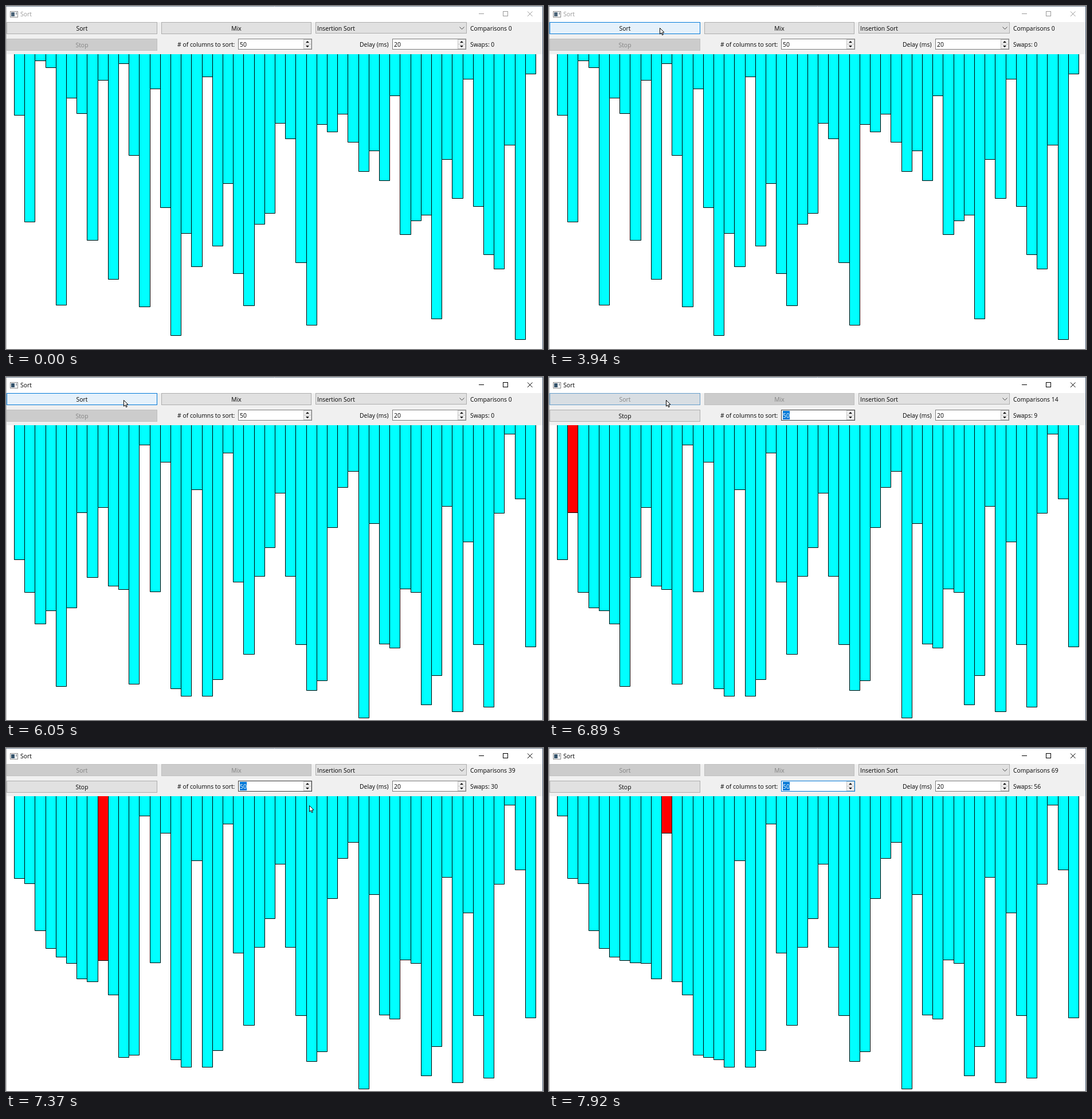
Write an HTML page with a canvas that moves like this. It is 937 px wide and 598 px high and loops after 7.99 s.

```html
<!DOCTYPE html>
<html lang="en">
<head>
<meta charset="utf-8">
<title>Sort</title>
<style>
html, body { margin: 0; width: 100%; height: 100%; overflow: hidden; background: #fff; }
canvas { display: block; }
</style>
</head>
<body>
<canvas id="stage" width="937" height="598"></canvas>
<script>
const g = document.getElementById('stage').getContext('2d');
const LOOP = 7990, SORT_AT = 6610, MIX_AT = 4820, ACTIVE_AT = 4690;

// Bottom edge of each column
const before = [190, 376, 95, 107, 521, 160, 187, 408, 129, 476, 100, 260, 524, 144, 351, 574, 396,
  454, 123, 418, 309, 466, 522, 380, 361, 204, 231, 447, 556, 206, 219, 188, 237, 288, 252, 304,
  156, 398, 374, 364, 545, 267, 335, 127, 349, 433, 458, 242, 581, 118];
const mixed = [318, 375, 430, 407, 539, 402, 236, 349, 227, 364, 370, 535, 118, 374, 148, 543, 556,
  196, 556, 527, 132, 357, 483, 347, 297, 202, 347, 466, 546, 529, 262, 192, 164, 594, 255, 465,
  472, 369, 375, 571, 520, 225, 583, 287, 466, 575, 237, 99, 212, 470];

// One state per comparison of the insertion sort
function sortStates(cols) {
  const a = cols.slice(), states = [{ a: cols, swaps: 0, red: 1 }];
  let swaps = 0;
  for (let i = 1; i < 16; i++) {
    for (let j = i, moving = true; moving;) {
      moving = j > 0 && a[j] < a[j - 1];
      if (moving) {
        [a[j - 1], a[j]] = [a[j], a[j - 1]];
        j--;
        swaps++;
      }
      states.push({ a: a.slice(), swaps, red: j });
    }
  }
  return states;
}
const states = sortStates(mixed);

// Linear track of [time, ...values]
function track(t, keys) {
  if (t <= keys[0][0]) return keys[0].slice(1);
  for (let i = 1; i < keys.length; i++) {
    const p = keys[i - 1], q = keys[i];
    if (t < q[0]) {
      const k = (t - p[0]) / (q[0] - p[0]);
      return p.slice(1).map((v, n) => v + (q[n + 1] - v) * k);
    }
  }
  return keys[keys.length - 1].slice(1);
}
const level = (t, ...keys) => track(t, keys)[0];
const blend = (a, b, k) => a.map((v, i) => v + (b[i] - v) * k);
const css = c => `rgb(${c.map(Math.round)})`;

const cursorPath = [
  [250, 881, 557], [520, 668, 180], [680, 352, 12], [800, 340, 32], [990, 340, 30],
  [1130, 284, 9], [1340, 225, 63], [1620, 169, 38], [3939, 169, 38], [3940, 193, 38],
  [4290, 324, 42], [5350, 322, 42], [5700, 262, 25], [6050, 205, 40], [6150, 203, 40],
  [6890, 203, 40], [7100, 330, 17], [7370, 529, 100]
];

function box(x, y, w, h, fill, line) {
  g.fillStyle = fill;
  g.fillRect(x, y, w, h);
  g.strokeStyle = line;
  g.strokeRect(x + .5, y + .5, w - 1, h - 1);
}

function line(color, ...pts) {
  g.strokeStyle = color;
  g.beginPath();
  for (let i = 0; i < pts.length; i += 2) g.lineTo(pts[i], pts[i + 1]);
  g.stroke();
}

function shape(color, x, y, pts) {
  g.beginPath();
  for (let i = 0; i < pts.length; i += 2) g.lineTo(x + pts[i], y + pts[i + 1]);
  g.closePath();
  g.fillStyle = color;
  g.fill();
}

function text(s, x, y, color = '#000', align = 'left') {
  g.fillStyle = color;
  g.textAlign = align;
  g.fillText(s, x, y);
}

function button(label, x, y, w, { hot = 0, press = 0, off = 0, grey = off > 0 }) {
  const fill = blend(blend([225, 225, 225], [229, 241, 251], hot), [204, 228, 247], press);
  const edge = blend([173, 173, 173], [0, 120, 215], hot);
  box(x, y, w, 21, css(blend(fill, [204, 204, 204], off)), css(blend(edge, [191, 191, 191], off)));
  text(label, x + w / 2, y + 15, grey ? '#838383' : '#000', 'center');
}

function spin(value, x, edge, selected) {
  box(x, 57, 129, 19, '#fff', edge);
  if (selected) {
    g.fillStyle = '#0078d7';
    g.fillRect(x + 3, 59, 12, 15);
  }
  text(value, x + 3, 71, selected ? '#fff' : '#000');
  box(x + 114, 58, 14, 9, '#f0f0f0', '#c4c4c4');
  box(x + 114, 66, 14, 9, '#f0f0f0', '#c4c4c4');
  shape('#000', x + 121, 61, [-3, 3, 0, 0, 3, 3]);
  shape('#000', x + 121, 69, [-3, 0, 0, 3, 3, 0]);
}

function titleBar(active) {
  const ink = active ? '#000' : '#999';
  box(7, 9, 14, 11, '#fff', '#8a8a8a');
  g.fillStyle = active ? '#36546c' : '#4c6478';
  g.fillRect(9, 11, 6, 7);
  g.fillStyle = '#9aa4ac';
  g.fillRect(17, 11, 2, 4);
  text('Sort', 25, 18, ink);
  line(ink, 825, 13.5, 834, 13.5);
  g.strokeRect(867.5, 9.5, 8, 8);
  line(ink, 910, 9.5, 918.5, 18);
  line(ink, 918.5, 9.5, 910, 18);
}

function toolbar(t, comps, swaps) {
  const sorting = t >= SORT_AT;
  g.fillStyle = '#f0f0f0';
  g.fillRect(1, 28, 935, 56);
  button('Sort', 1, 28, 263, {
    hot: level(t, [1340, 0], [1560, 1], [4060, 1], [4290, 0], [5700, 0], [5950, 1]),
    off: level(t, [SORT_AT - 1, 0], [7150, 1]),
    grey: sorting
  });
  button('Mix', 271, 28, 262, {
    hot: level(t, [680, 0], [800, 1], [1000, 1], [1250, 0], [4100, 0], [4290, 1], [5600, 1], [5850, 0]),
    press: level(t, [4690, 0], [4750, 1], [4820, .75], [5020, 0]),
    off: level(t, [SORT_AT - 1, 0], [6800, 1]),
    grey: sorting
  });
  button('Stop', 1, 57, 263, { off: level(t, [SORT_AT - 1, 1], [6800, 0]), grey: !sorting });

  box(540, 28, 264, 20, '#e1e1e1', '#adadad');
  text('Insertion Sort', 543, 43);
  line('#444', 791.5, 36.5, 795.5, 40.5, 799.5, 36.5);

  text('# of columns to sort:', 299, 71);
  const edge = sorting ? track(t, [[SORT_AT, 60, 60, 60], [7400, 60, 60, 60], [7850, 0, 120, 215]]) : [122, 122, 122];
  spin('50', 405, css(edge), sorting);
  text('Delay (ms)', 617, 71);
  spin('20', 674, '#7a7a7a');
  text('Comparisons ' + comps, 810, 43);
  text('Swaps: ' + swaps, 810, 71);
}

function columns(cols, red) {
  cols.forEach((bottom, i) => {
    const x = Math.round(14 + i * 18.2), w = Math.round(32.2 + i * 18.2) - x + 1;
    g.fillStyle = i === red ? '#f00' : '#0ff';
    g.fillRect(x, 84, w, bottom - 83);
    line('#000', x + .5, 84, x + .5, bottom + .5, x + w - .5, bottom + .5, x + w - .5, 84);
  });
}

function cursor(x, y) {
  shape('#fff', x, y, [.5, .5, .5, 11, 3, 8.8, 4.6, 12.6, 6.3, 11.9, 4.7, 8.2, 8, 8]);
  g.strokeStyle = '#000';
  g.stroke();
}

function draw(t) {
  let cols = t < MIX_AT ? before : mixed, red = -1, comps = 0, swaps = 0;
  if (t >= SORT_AT) {
    // The screen refreshes in ticks while the sort slowly gains pace
    const k = Math.floor((t - SORT_AT) / 68.9);
    comps = Math.round(3.5 * k + .0069 * k * k);
    ({ a: cols, swaps, red } = states[comps]);
  }
  g.lineWidth = 1;
  g.font = '10.4px "Open Sans", "Noto Sans", sans-serif';
  g.fillStyle = '#fff';
  g.fillRect(0, 0, 937, 598);
  titleBar(t >= ACTIVE_AT);
  toolbar(t, comps, swaps);
  columns(cols, red);
  line('#b4b4b4', .5, 0, .5, 598);
  line('#6f7f90', 0, .5, 937, .5);
  line('#4a5f78', 936.5, 0, 936.5, 598);
  if (t >= 250 && t < 7440) cursor(...track(t, cursorPath).map(Math.round));
}

function frame() {
  draw(performance.now() % LOOP);
  requestAnimationFrame(frame);
}
frame();
</script>
</body>
</html>
```
